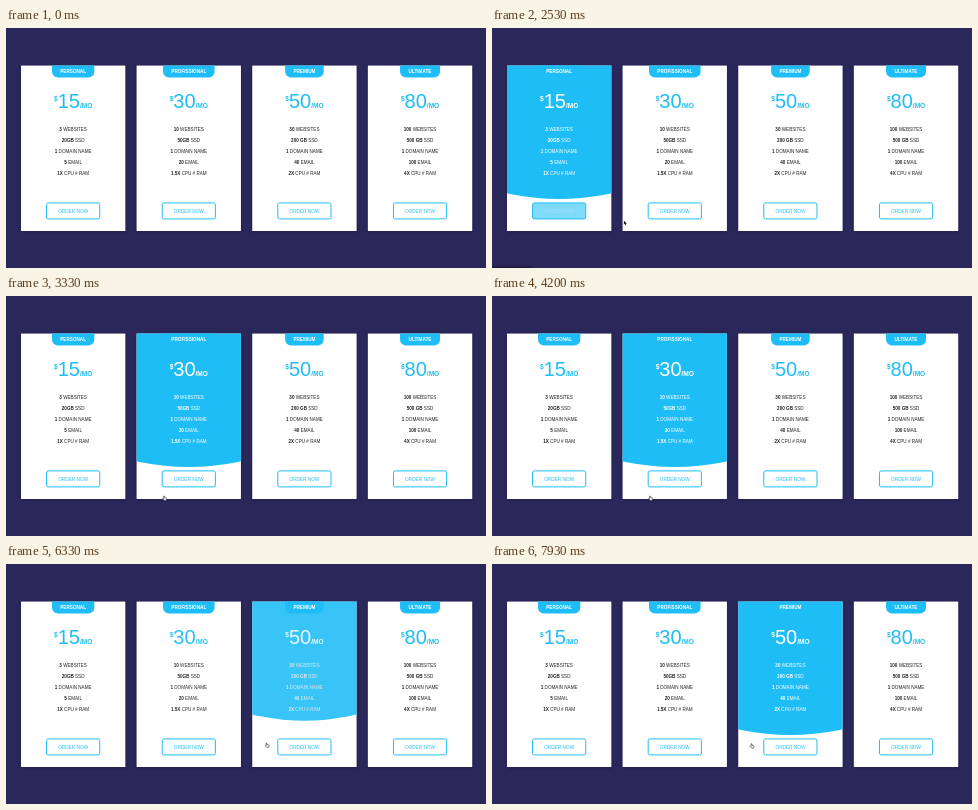
An HTML page that plays this animation: 480 px wide and 240 px high, repeating every 8 s.

```html
<!DOCTYPE html>
<html lang="en">
<head>
<meta charset="utf-8">
<title>Pricing cards</title>
<style>
  html, body { margin: 0; width: 100%; height: 100%; overflow: hidden; background: #2a275b; }
  svg { display: block; width: 100vw; height: 100vh; }
  text { font-family: "Liberation Sans", Arial, sans-serif; text-anchor: middle; }
  .b { font-weight: 700; }
</style>
</head>
<body>
<svg id="stage" viewBox="0 0 480 240"></svg>
<script>
const LOOP = 8000, FADE = 500;
const BLUE = [31, 189, 245], INK = [34, 34, 34], WHITE = [255, 255, 255];
const W = 104.3, H = 165.4, TOP = 37.6, MID = W / 2;

// on/off: card hover, press: button hover
const plans = [
  { name: 'PERSONAL', tab: 42.4, price: 15, on: 730, off: 2535, press: [730, 2400],
    rows: ['3| WEBSITES', '20GB| SSD', '1| DOMAIN NAME', '5| EMAIL', '1X| CPU # RAM'] },
  { name: 'PROFISSIONAL', tab: 51.6, price: 30, on: 2785, off: 5970, press: [4530, 5950],
    rows: ['10| WEBSITES', '50GB| SSD', '1| DOMAIN NAME', '20| EMAIL', '1.5X| CPU # RAM'] },
  { name: 'PREMIUM', tab: 38.6, price: 50, on: 6030, off: Infinity, press: [6560, 7430],
    rows: ['30| WEBSITES', '200 GB| SSD', '1| DOMAIN NAME', '40| EMAIL', '2X| CPU # RAM'] },
  { name: 'ULTIMATE', tab: 40, price: 80, on: Infinity, off: Infinity, press: [Infinity, Infinity],
    rows: ['100| WEBSITES', '500 GB| SSD', '1| DOMAIN NAME', '100| EMAIL', '4X| CPU # RAM'] }
];

// time, x, y of the pointer tip
const path = [
  [70, 284, 240], [530, 85, 187], [2070, 85, 187], [2530, 131.8, 192.6],
  [2870, 157, 202.6], [2930, 157, 199.6], [4470, 157, 199.6], [5070, 190, 187],
  [5270, 190, 187], [5400, 193, 187.6], [5930, 193, 187.6], [6400, 271, 177],
  [6540, 271, 177], [6740, 293, 182], [7530, 293, 182], [7860, 258.5, 179.3]
];

const rgb = c => `rgb(${c.map(Math.round)})`;
const mix = (a, b, k) => rgb(a.map((v, i) => v + (b[i] - v) * k));
const clamp = v => Math.min(1, Math.max(0, v));

// CSS "ease": cubic-bezier(.25, .1, .25, 1)
function ease(x) {
  if (x <= 0 || x >= 1) return clamp(x);
  let lo = 0, hi = 1, u;
  for (let i = 0; i < 24; i++) {
    u = (lo + hi) / 2;
    const bx = .75 * u * (1 - u) + u ** 3;
    if (bx < x) lo = u; else hi = u;
  }
  return .3 * u * (1 - u) ** 2 + 3 * u * u * (1 - u) + u ** 3;
}
const hover = (t, on, off) => ease((t - on) / FADE) - ease((t - off) / FADE);

function cardMarkup(p, i) {
  const l = MID - p.tab / 2, r = MID + p.tab / 2;
  const rows = p.rows.map((row, n) => {
    const [bold, rest] = row.split('|');
    return `<text x="${MID}" y="${65.5 + n * 11.05}" font-size="4.6"><tspan class="b">${bold}</tspan>${rest}</text>`;
  }).join('');
  return `<g class="card" transform="translate(${15 + i * 115.63} ${TOP})">
    <rect width="${W}" height="${H}" fill="#fff" filter="url(#shade)"/>
    <g clip-path="url(#box)"><circle class="wave" cx="${MID}" fill="${rgb(BLUE)}"/></g>
    <path d="M${l} 0H${r}V6a6 6 0 0 1-6 6H${l + 6}a6 6 0 0 1-6-6Z" fill="${rgb(BLUE)}"/>
    <text class="b" x="${MID}" y="7.6" font-size="4.68" fill="#fff">${p.name}</text>
    <g class="price">
      <text class="b" x="${MID - 17.3}" y="35.4" font-size="6.6">$</text>
      <text x="${MID - 4.3}" y="42.7" font-size="20">${p.price}</text>
      <text class="b" x="${MID + 13}" y="42.7" font-size="6.6">/MO</text>
    </g>
    <g class="rows">${rows}</g>
    <rect class="btn" x="${MID - 26.6}" y="137.3" width="53.2" height="16" rx="1.8" fill="${rgb(BLUE)}" stroke="${rgb(BLUE)}"/>
    <text class="order" x="${MID}" y="147" font-size="4.74">ORDER NOW</text>
  </g>`;
}

const stage = document.getElementById('stage');
stage.innerHTML = `
  <defs>
    <clipPath id="box"><rect width="${W}" height="${H}"/></clipPath>
    <filter id="shade" x="-10%" y="-10%" width="120%" height="120%">
      <feDropShadow dx="0" dy="1" stdDeviation="2" flood-color="#000" flood-opacity=".2"/>
    </filter>
  </defs>
  <rect width="480" height="240" fill="#2a275b"/>
  ${plans.map(cardMarkup).join('')}
  <rect id="status" y="238.5" width="40" height="1.5" fill="#1c1b38"/>
  <g id="pointer">
    <path id="arrow" d="M0 0V4L1 3.2L1.7 4.8L2.4 4.5L1.7 2.9H3Z" fill="#111" stroke="#fff" stroke-width=".5" paint-order="stroke"/>
    <path id="hand" d="M.6 .5Q1 -.1 1.4 .5V1.9L3.2 2.2Q3.7 2.4 3.6 3L3.1 4.8H1.1L-.4 3Q-.3 2.4 .6 2.9Z" fill="#f4f4f4" stroke="#333" stroke-width=".6"/>
  </g>`;

const pick = id => document.getElementById(id);
const pointer = pick('pointer'), arrow = pick('arrow'), hand = pick('hand'), status = pick('status');
const cards = [...stage.querySelectorAll('.card')].map(el => {
  const part = name => el.querySelector('.' + name);
  return { wave: part('wave'), price: part('price'), rows: part('rows'), btn: part('btn'), order: part('order') };
});
const show = (el, on) => el.setAttribute('visibility', on ? 'visible' : 'hidden');

function pointerAt(t) {
  const n = path.findIndex(k => k[0] > t);
  if (n < 0) return path[path.length - 1].slice(1);
  if (n === 0) return path[0].slice(1);
  const [a, b] = [path[n - 1], path[n]];
  const k = (t - a[0]) / (b[0] - a[0]);
  return [a[1] + (b[1] - a[1]) * k, a[2] + (b[2] - a[2]) * k];
}

function draw(t) {
  plans.forEach((p, i) => {
    const c = cards[i];
    const s = clamp(hover(t, p.on, p.off));
    const f = clamp(hover(t, ...p.press));
    c.wave.setAttribute('r', 246 * s);
    c.wave.setAttribute('cy', 9 - 121.7 * s);
    c.wave.setAttribute('opacity', s);
    c.price.setAttribute('fill', mix(BLUE, WHITE, s));
    c.rows.setAttribute('fill', mix(INK, WHITE, s));
    c.btn.setAttribute('fill-opacity', f);
    c.order.setAttribute('fill', mix(BLUE, WHITE, f));
  });
  const isArrow = t < 730 || (t > 2400 && t < 2930);
  show(arrow, t >= 70 && isArrow);
  show(hand, !isArrow);
  show(status, (t > 1200 && t < 2700) || (t > 5270 && t < 6200) || (t > 6950 && t < 7700));
  pointer.setAttribute('transform', `translate(${pointerAt(t)})`);
}

const start = performance.now();
function tick() {
  draw((performance.now() - start) % LOOP);
  requestAnimationFrame(tick);
}
tick();
</script>
</body>
</html>
```
